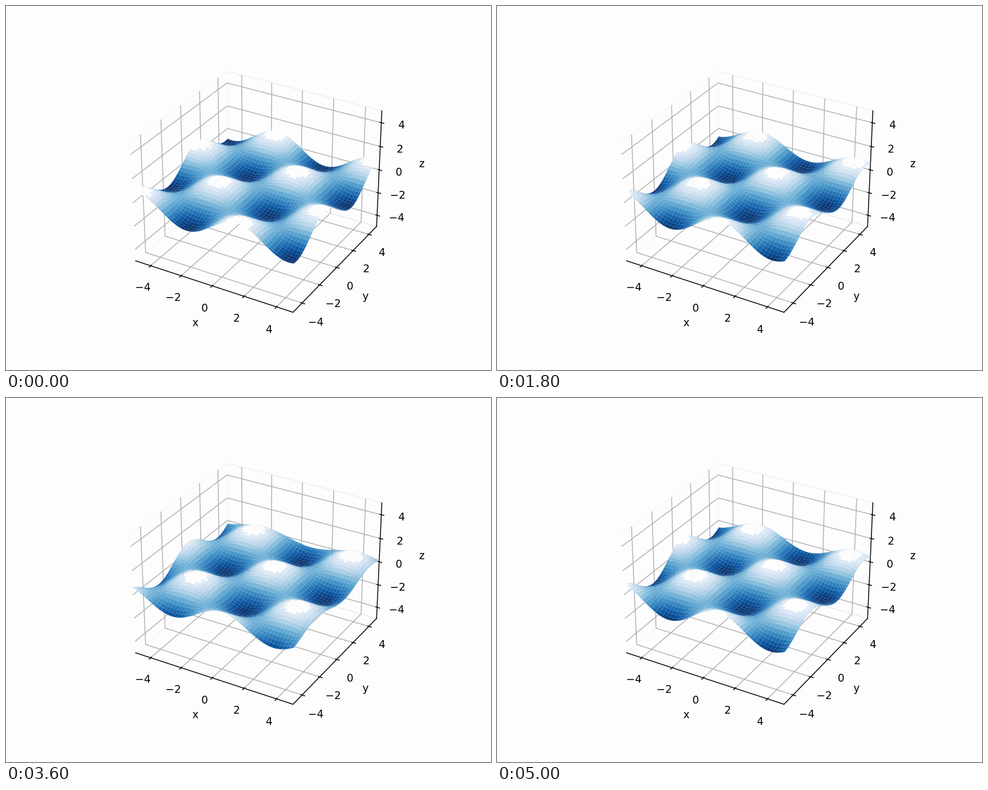
Recreate the animation shown at these times as a matplotlib script. Size 864 by 648 pixels, loop 5100 ms.

```python
import matplotlib.pyplot as plt
import numpy as np
from matplotlib.animation import FuncAnimation
from matplotlib.colors import ListedColormap

FRAMES = 51
INTERVAL = 100
PHASE_STEP = 0.2
LIMIT = 5
PAPER = "#fdfdfd"
CREST = 0.9  # share of the colour range below the white crests


def wave_colors():
    colors = plt.get_cmap("Blues_r")(np.linspace(0, 1, 256))
    colors[int(CREST * 256):, :3] = 253 / 255
    return ListedColormap(colors)


fig = plt.figure(figsize=(6.4, 4.8), dpi=135, facecolor=PAPER)
ax = fig.add_subplot(projection="3d", facecolor=PAPER)
ax.set(xlim=(-LIMIT, LIMIT), ylim=(-LIMIT, LIMIT), zlim=(-LIMIT, LIMIT),
       xlabel="x", ylabel="y", zlabel="z")
for axis in (ax.xaxis, ax.yaxis, ax.zaxis):
    axis.pane.fill = False

side = np.linspace(-LIMIT, LIMIT, 100)
X, Y = np.meshgrid(side, side)
cmap = wave_colors()
surface = None


def draw(frame):
    global surface
    if surface is not None:
        surface.remove()
    phase = PHASE_STEP * frame
    Z = np.sin(X + phase) * np.sin(Y + phase)
    surface = ax.plot_surface(X, Y, Z, cmap=cmap, vmin=-1, vmax=1)
    return [surface]


anim = FuncAnimation(fig, draw, frames=FRAMES, interval=INTERVAL,
                     init_func=lambda: draw(0), repeat=True, repeat_delay=0)
plt.show()
```
